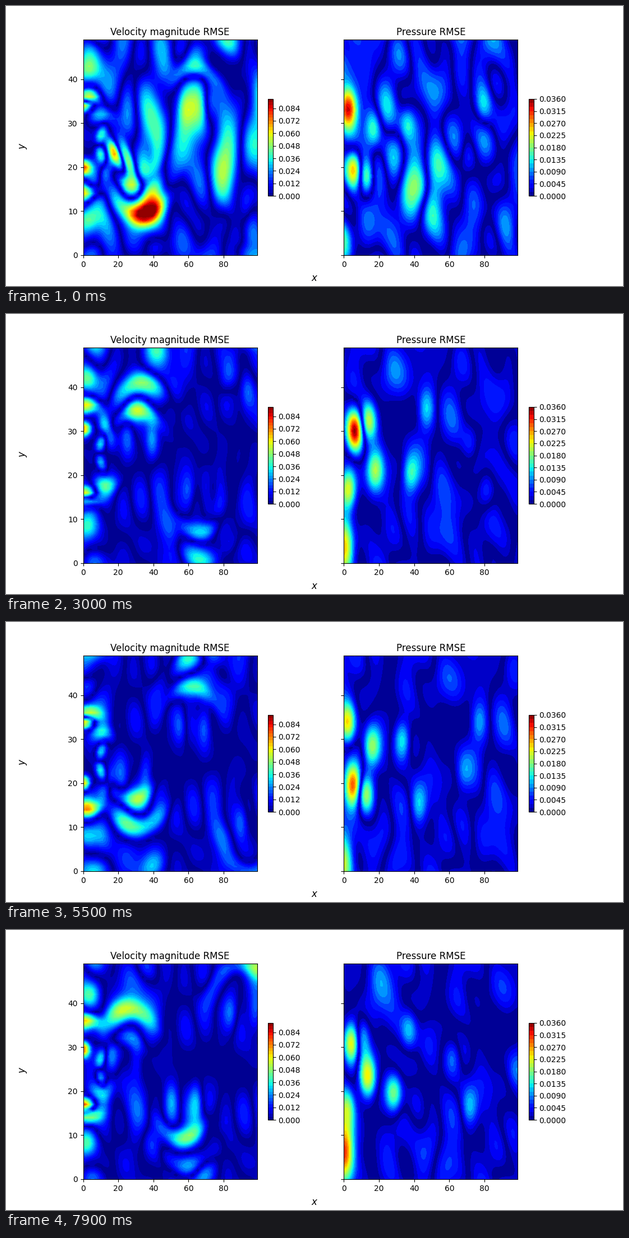
Recreate the animation shown at these times as a matplotlib script. Size 1100 by 500 pixels, loop 8 s.

```python
import numpy as np
import matplotlib.pyplot as plt
from matplotlib.animation import FuncAnimation

FRAMES, STEP_MS = 80, 100
PERIOD = 57       # shedding period in steps
SPEED = 1.2       # grid cells per step, far downstream
X, Y = np.meshgrid(np.arange(100.0), np.arange(50.0))


def eddy(y, xc, yc, w, h, a, bend=0, shear=0):
    """A Gaussian spot, optionally bent into a crescent or sheared."""
    dx, dy = X - xc, y - yc
    u = (dx - shear * dy) / w
    v = (dy - bend * dx ** 2) / h
    return a * np.exp(-u ** 2 - v ** 2)


def path(age):
    """Distance downstream: slow near the inlet, then constant speed."""
    near = 33 * np.exp(SPEED * min(age, 0) / 33)
    return near + SPEED * max(age, 0)


def pulse(phase, centre, width):
    d = (phase - centre + PERIOD / 2) % PERIOD - PERIOD / 2
    return np.exp(-(d / width) ** 2)


def velocity_inlet(t, y):
    p = t % PERIOD
    q = (t - 40) % PERIOD
    core = np.interp(q, [0, 6, 45, PERIOD], [0, 88, 80, 0])
    outer = 38 + 14 * np.cos(2 * np.pi * (p - 11) / PERIOD)
    return (eddy(y, 0, 22 - .13 * q, 3 + .08 * q, 2 - .015 * q, core)
            - eddy(y, 2, 14.2, 8, 1.7, 58, .006)
            + eddy(y, 2, 8.3, 7, 3, outer)
            - eddy(y, 6, 0, 8, 2.8, 32)
            - eddy(y, 13, 19.3, 3.8, 4, 55 * pulse(p, 8, 12), 0, .7)
            + eddy(y, 10, 23, 3, 2.6, 36, 0, -.8))


def velocity_street(t, y):
    """Paired crescents with weaker spots on both sides of them."""
    total = 0
    for age in t % PERIOD + PERIOD * np.array([-1, 0, 1]):
        x = path(age)
        grow = min(1, x / 30)
        amp = np.interp(age, [-50, -25, 0, 60], [0, 38, 57, 22])
        inner = amp * np.interp(age, [-20, 3], [0, 1])
        spot = np.interp(age, [-20, 0], [0, 23])
        total = (total
                 - eddy(y, x, 9.5 - .3 * age, 4 + 10 * grow,
                        1.6 + 1.2 * grow, amp, .014)
                 + eddy(y, x - 3, 15.7 - .29 * age, 12, 2.3, inner, .017)
                 - eddy(y, x - 9, 22 - .19 * age, 4, 4.5, spot)
                 + eddy(y, x + 5, 22 - .19 * age, 3.6, 4.8, spot)
                 + eddy(y, x + 9, 1.5, 7, 3.5, spot * 1.3, 0, .5)
                 + eddy(y, x - 20, 8, 5, 4, spot * .8, 0, -.6))
    return total


def pressure_half(t, y):
    """A slow core, its forerunner and a faint outer spot per cycle."""
    total = 0
    for age in t % PERIOD + PERIOD * np.array([-2, -1, 0, 1]):
        ahead, far = age + 21, age + 39
        yc = np.interp(age, [-75, -45, -25, 8, 50], [16.5, 20, 23, 15, 17])
        core = np.interp(age, [-90, -75, -36, -20, 0, 50],
                         [0, 75, 92, 46, 36, 26])
        lead = np.interp(ahead, [-45, -22, 10, 40], [0, 70, 36, 14])
        faint = np.interp(far, [-45, 0, 30], [0, 27, 10])
        total = (total
                 + eddy(y, path(age), yc, 4.8, 4.8, core)
                 - eddy(y, path(ahead), 17.5 + .08 * (ahead + 30),
                        4.8, 4.6, lead)
                 + eddy(y, path(far), 7, 7, 6.5, faint))
    return total


def velocity(t, start):
    flipped = 50.2 - Y
    wake = (velocity_inlet(t, Y) - velocity_inlet(t - 28.5, flipped)
            + velocity_street(t, Y) - velocity_street(t - 29, flipped))
    snake = (np.sin(2 * np.pi * (X - 50 - .25 * (Y - 28)) / 42)
             * np.exp(-((Y - 27) / 15) ** 2) / (1 + np.exp((24 - X) / 2)))
    burst = (42 * snake
             - eddy(Y, 34, 9, 11, 3, 38, .012)
             + eddy(Y, 25, 22, 3.5, 4.5, 70, 0, -.8)
             - eddy(Y, 17.5, 23.5, 3, 3.2, 60, 0, -1)
             - eddy(Y, 70, 48, 15, 3.5, 30))
    return wake + start * burst


def pressure(t, start):
    turn = 2 * np.pi / PERIOD
    corner = eddy(Y, 0, 3.5 + 4 * np.cos(turn * (t - 16)), 5.5, 7,
                  70 + 22 * np.cos(turn * (t - 26)))
    wake = pressure_half(t - 47, Y) - pressure_half(t - 18.5, 50 - Y)
    stripes = np.cos(2 * np.pi * (X - 40 - .2 * (Y - 18)) / 30)
    burst = (stripes * eddy(Y, 40, 18, 18, 12, 52)
             - eddy(Y, 4, 33, 7, 4.5, 30))
    return wake + corner + start * burst


def make_ripple(seed, level, count=12):
    """Weak random waves that drift with the flow."""
    rng = np.random.default_rng(seed)
    kx, ky = rng.normal(0, .19, count), rng.normal(0, .17, count)
    shift = rng.uniform(0, 2 * np.pi, count)
    scale = level * np.sqrt(2 / count)

    def ripple(t):
        x = X - SPEED * t
        return scale * sum(np.sin(a * x + b * Y + c)
                           for a, b, c in zip(kx, ky, shift))
    return ripple


PANELS = [
    ("Velocity magnitude RMSE", velocity, make_ripple(4, 8),
     np.arange(32) * .003),
    ("Pressure RMSE", pressure, make_ripple(9, 7), np.arange(25) * .0015),
]

fig, axes = plt.subplots(1, 2, figsize=(11, 5), dpi=100, sharey=True)
fig.supxlabel("$x$")
fig.supylabel("$y$")


def fill(ax, panel, t):
    _, field, ripple, levels = panel
    start = np.exp(-t / 4)
    percent = abs(field(t, start) + (1 + .7 * start) * ripple(t))
    return ax.contourf(X, Y, np.clip(percent / 100, 0, .999) * levels[-1],
                       levels=levels, cmap="jet")


maps = []
for ax, panel in zip(axes, PANELS):
    ax.set_title(panel[0])
    maps.append(fill(ax, panel, 0))
    fig.colorbar(maps[-1], ax=ax, shrink=.45)


def update(t):
    for i, (ax, panel) in enumerate(zip(axes, PANELS)):
        maps[i].remove()
        maps[i] = fill(ax, panel, t)
    return maps


anim = FuncAnimation(fig, update, frames=FRAMES, interval=STEP_MS,
                     init_func=lambda: maps, repeat=True, repeat_delay=0)
plt.show()
```
